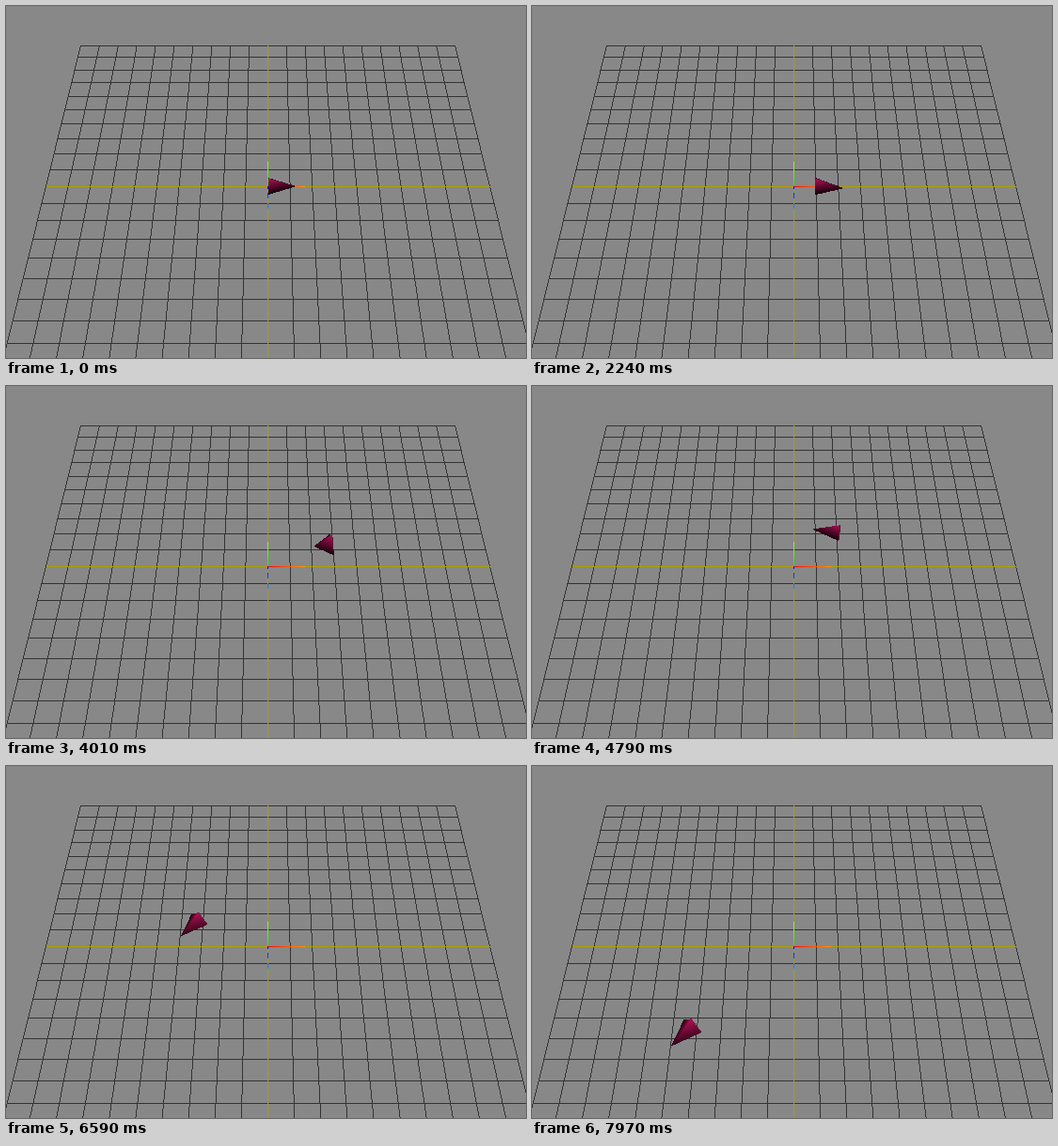
These frames come from a looping animation (553 px wide and 375 px high, 8000 ms). An HTML page:

```html
<!DOCTYPE html>
<html lang="en">
<head>
<meta charset="utf-8">
<title>Cone on a grid</title>
<style>
  html, body { margin: 0; width: 100%; height: 100%; overflow: hidden; background: #888; }
  svg { display: block; }
</style>
</head>
<body>
<svg id="stage" width="553" height="375" viewBox="0 0 553 375" shape-rendering="crispEdges">
  <defs id="defs">
    <linearGradient id="axisX" gradientUnits="userSpaceOnUse" x1="278" y1="0" x2="318" y2="0">
      <stop offset="0" stop-color="#f00"/><stop offset="1" stop-color="#f90"/>
    </linearGradient>
    <linearGradient id="axisY" gradientUnits="userSpaceOnUse" x1="0" y1="192" x2="0" y2="166">
      <stop offset="0" stop-color="#0f0"/><stop offset="1" stop-color="#9f0"/>
    </linearGradient>
    <linearGradient id="axisZ" gradientUnits="userSpaceOnUse" x1="0" y1="192" x2="0" y2="216">
      <stop offset="0" stop-color="#00f"/><stop offset="1" stop-color="#09f"/>
    </linearGradient>
  </defs>
  <path id="grid" stroke="#333" fill="none"/>
  <path id="middle" stroke="#aaa000" fill="none"/>
  <rect x="278" y="192" width="40" height="1" fill="url(#axisX)"/>
  <rect x="278" y="166" width="1" height="26" fill="url(#axisY)"/>
  <path d="M278 192h1v3h-1zM278 199h1v6h-1zM278 211h1v5h-1z" fill="url(#axisZ)"/>
  <g id="cone"></g>
</svg>
<script>
const $ = id => document.getElementById(id);
const NS = 'http://www.w3.org/2000/svg';
const HEIGHT = 375, LOOP = 8000, HOLD = 500, STEP = 30;
const CX = 278.5, CY = 192, UNIT = 23.6, TILT = 17.78, RISE = 15.55, NEAR = 0.0186;

// World point (x right, y up, z towards the viewer) to stage pixels.
function project([x, y, z]) {
  const depth = 1 - NEAR * z - 0.0209 * y;
  return [CX + UNIT * x / depth, CY + (TILT * z - RISE * y) / depth];
}

// Stage pixel to the ground point under it.
function ground([px, py]) {
  const dy = py - CY, z = dy / (TILT + NEAR * dy);
  return [(px - CX) * (1 - NEAR * z) / UNIT, 0, z];
}

// One pixel per row, so that slanted lines stay thin.
function pixelLine([x1, y1], [x2, y2]) {
  let d = '';
  for (let y = Math.floor(y1); y < Math.min(y2, HEIGHT); y++) {
    const x = x1 + (x2 - x1) * (y + 0.5 - y1) / (y2 - y1);
    d += `M${Math.floor(x)} ${y + 0.5}h1`;
  }
  return d;
}

function drawGrid() {
  let lines = '', middle = '';
  for (let i = -10; i <= 10; i++) {
    const [x1, y] = project([-10, 0, i]), x2 = project([10, 0, i])[0];
    const d = `M${x1} ${Math.floor(y) + 0.5}H${x2}` +
      pixelLine(project([i, 0, -10]), project([i, 0, 10]));
    if (i) lines += d; else middle += d;
  }
  $('grid').setAttribute('d', lines);
  $('middle').setAttribute('d', middle);
}

// Route of the cone's base centre: time, x and y on the stage.
const route = [
  [500, 278.5, 192], [1250, 285, 192], [2000, 296.7, 192], [2750, 313, 192],
  [3500, 335, 186], [4250, 346.5, 162], [5000, 316, 154.5], [5750, 269, 144.5],
  [6500, 211, 160], [6965, 190.5, 187], [7190, 187.5, 205.5], [7700, 191, 258], [7970, 171, 277]
];

function slope(i, c) {
  const a = route[Math.max(i - 1, 0)], b = route[Math.min(i + 1, route.length - 1)];
  return (b[c] - a[c]) / (b[0] - a[0]);
}

// Smooth curve through the route.
function placeAt(t) {
  let i = 0;
  while (i < route.length - 2 && t >= route[i + 1][0]) i++;
  const a = route[i], b = route[i + 1], span = b[0] - a[0];
  const u = Math.min(1, Math.max(0, (t - a[0]) / span)), v = 1 - u;
  return [1, 2].map(c =>
    a[c] * v * v * (1 + 2 * u) + b[c] * u * u * (3 - 2 * u) +
    span * u * v * (v * slope(i, c) - u * slope(i + 1, c)));
}

const add = (p, d, k) => p.map((v, i) => v + d[i] * k);
const dot = (a, b) => a.reduce((sum, v, i) => sum + v * b[i], 0);
const cross = (a, b, c) => (b[0] - a[0]) * (c[1] - a[1]) - (b[1] - a[1]) * (c[0] - a[0]);
const LIGHT = [0.5, 1, 0];
const DARK = [16, 1, 8], BRIGHT = [178, 16, 86];
const tone = k => `rgb(${DARK.map((d, i) => Math.round(d + (BRIGHT[i] - d) * k))})`;
const lit = n => Math.min(1, Math.max(0, dot(n, LIGHT)));

function make(tag, parent, attrs = {}) {
  const el = document.createElementNS(NS, tag);
  for (const k in attrs) el.setAttribute(k, attrs[k]);
  return parent.appendChild(el);
}

const cap = make('polygon', $('cone'));
const faces = [0, 1, 2, 3].map(i => {
  const ramp = make('linearGradient', $('defs'), { id: 'ramp' + i, gradientUnits: 'userSpaceOnUse' });
  make('stop', ramp, { offset: 0, 'stop-color': tone(0) });
  make('stop', ramp, { offset: 1, 'stop-color': tone(1) });
  return { ramp, shape: make('polygon', $('cone'), { fill: `url(#ramp${i})` }) };
});

// Shade a triangle so that brightness runs evenly between its corners.
function shade(ramp, [a, b, c], [ia, ib, ic]) {
  const area = cross(a, b, c);
  const gx = ((ib - ia) * (c[1] - a[1]) - (ic - ia) * (b[1] - a[1])) / area;
  const gy = ((ic - ia) * (b[0] - a[0]) - (ib - ia) * (c[0] - a[0])) / area;
  const g2 = gx * gx + gy * gy + 1e-9;
  const at = v => [a[0] + gx * (v - ia) / g2, a[1] + gy * (v - ia) / g2];
  const [p, q] = [at(0), at(1)];
  ramp.setAttribute('x1', p[0]);
  ramp.setAttribute('y1', p[1]);
  ramp.setAttribute('x2', q[0]);
  ramp.setAttribute('y2', q[1]);
}

function drawCone(t) {
  const base = ground(placeAt(t));
  const from = ground(placeAt(t - 5)), to = ground(placeAt(t + 5));
  // In the sharp bend the cone swings ahead of its route and looks stubbier.
  const bend = Math.exp(-(((t - 4030) / 300) ** 2));
  const angle = Math.atan2(from[2] - to[2], to[0] - from[0]) + 2 * bend;
  const length = 1.29 - 0.46 * bend, radius = 0.51 + 0.14 * bend;

  const c = Math.cos(angle), s = Math.sin(angle), ahead = [c, 0, -s];
  const spokes = [[0, 1, 0], [s, 0, c], [0, -1, 0], [-s, 0, -c]];
  const rim = spokes.map(d => project(add(base, d, radius)));
  const tip = project(add(base, ahead, length));
  const glow = spokes.map(lit);

  cap.setAttribute('points', rim.join(' '));
  cap.setAttribute('fill', tone(lit(ahead.map(v => -v))));
  cap.setAttribute('visibility', cross(rim[0], rim[1], rim[2]) > 0 ? 'visible' : 'hidden');

  faces.forEach(({ ramp, shape }, i) => {
    const j = (i + 1) % 4, corners = [rim[i], rim[j], tip];
    const seen = cross(...corners) < -0.5;
    shape.setAttribute('visibility', seen ? 'visible' : 'hidden');
    if (!seen) return;
    shape.setAttribute('points', corners.join(' '));
    shade(ramp, corners, [glow[i], glow[j], (glow[i] + glow[j]) * 0.15]);
  });
}

function frame(now) {
  const t = now % LOOP;
  drawCone(t < HOLD ? HOLD : HOLD + Math.floor((t - HOLD) / STEP) * STEP);
  requestAnimationFrame(frame);
}

drawGrid();
frame(performance.now());
</script>
</body>
</html>
```
